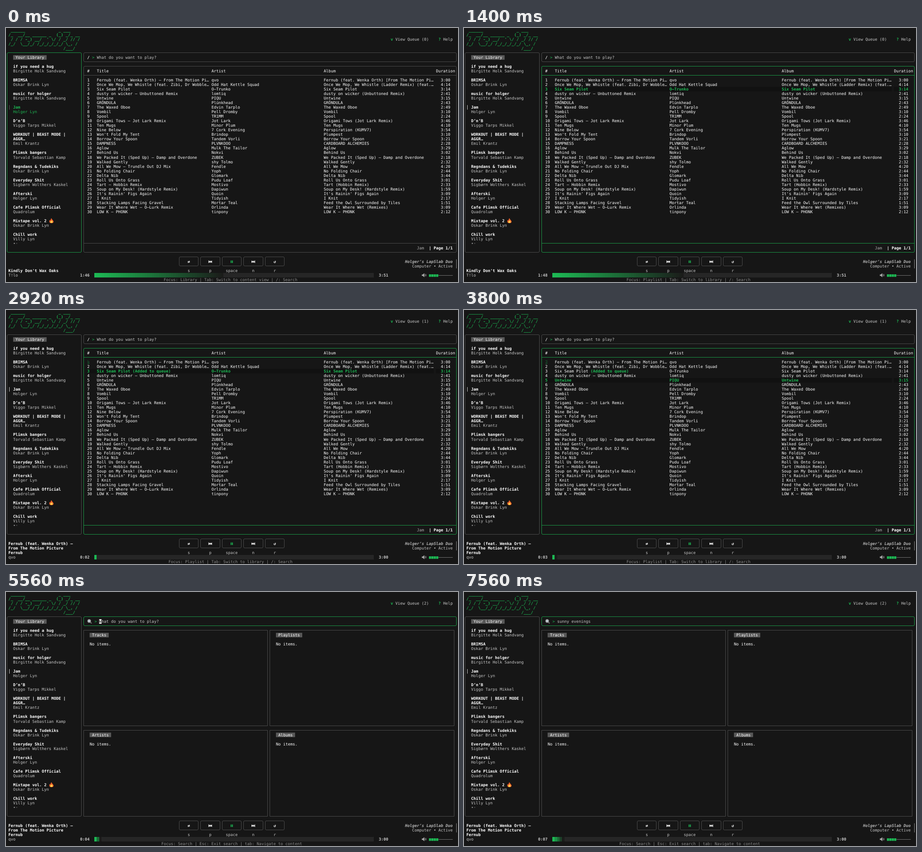
Animation, 998 px wide and 561 px high, one loop 8 s. Source, as an HTML page with a canvas:

```html
<!DOCTYPE html>
<html lang="en">
<head>
<meta charset="utf-8">
<title>Terminal music player</title>
<style>
  html, body { margin: 0; height: 100%; overflow: hidden; background: #161616; }
  canvas { display: block; }
</style>
</head>
<body>
<canvas id="stage" width="998" height="561"></canvas>
<script>
const ctx = document.getElementById('stage').getContext('2d');
const LOOP = 8000, CW = 5.275, RH = 561 / 56, EDGE = .8;
const BG = '#161616', GREEN = '#1db954', WHITE = '#ffffff', LIGHT = '#c8c8c8', GRAY = '#8c8c8c', LINE = '#585858';

const BANNER = [
  ' ______              _ ___',
  '/_  __/__ ______ _  (_) _/_ __',
  " / / / -_) __/  ' \\/ / _/ // /",
  '/_/  \\__/_/ /_/_/_/_/_/ \\_, /',
  '                       /___/'];

const LIBRARY = `if you need a hug|Birgitte Holk Sandvang
BRIMSA|Oskar Brink Lyn
music for holger|Birgitte Holk Sandvang
Jam|Holger Lyn
D’n’B|Viggo Tarps Mikkel
WORKOUT | BEAST MODE |/AGGR…|Emil Krantz
Plimsk bangers|Torvald Sebastian Kamp
Regndans & Tudekiks|Oskar Brink Lyn
Everyday Shit|Sigbørn Wolthers Kaskel
Afterski|Holger Lyn
Cafe Plimsk Official|Quadrolum
Mixtape vol. 2|Oskar Brink Lyn
Chill work|Villy Lyn`.split('\n').map(line => {
  const cut = line.lastIndexOf('|');
  return { title: line.slice(0, cut).split('/'), owner: line.slice(cut + 1) };
});

// title|artist|duration|album (album defaults to the title)
const TRACKS = `Fernub (feat. Wenka Orth) – From The Motion Pi…|qvo|3:00|Fernub (feat. Wenka Orth) [From The Motion Pi…
Once We Mop, We Whistle (feat. Zibi, Dr Wobble…|Odd Hat Kettle Squad|4:14|Once We Mop, We Whistle (Ladder Remix) (feat.…
Six Seam Pilot|O–Trunko|3:14
dusty on wicker – Unbuttoned Remix|lomtiq|2:41|dusty on wicker (Unbuttoned Remix)
Untwine|PIQU|3:15
GRÖNDULA|Plünkhead|2:43
The Waxed Oboe|Edvin Tarplo|2:49
Vombil|Pell Dromby|3:10
Spool|TR1MM|2:24
Origami Tows – Jot Lark Remix|Jot Lark|3:46|Origami Tows (Jot Lark Remix)
Ten Mugs|Minor Plum|4:10
Nine Below|7 Cork Evening|3:54|Perspiration (KUMV7)
Won't Fold My Tent|Brindop|3:10|Plumpest
Borrow Your Spoon|Tandem Vorli|3:21
DAMPNESS|PLVNKOOO|2:28|CARDBOARD ALCHEMIES
Aglow|Mulk The Tailor|3:29
Behind Us|Nokvi|3:02
We Packed It (Sped Up) – Damp and Overdone|ZUBEK|2:18
Walked Gently|shy Tolmo|2:32
All We Mow – Trundle Out DJ Mix|Fendle|4:20|All We Mow
No Folding Chair|Yoph|2:44
Delta Nib|Glomark|3:44
Roll Us Onto Grass|Pudu Loaf|3:01
Tart – Hobbin Remix|Mostivo|2:33|Tart (Hobbin Remix)
Soup on My Desk! (Hardstyle Remix)|Dapiwun|1:59
It's Rainin' Figs Again|Quoin|3:09
I Knit|Tidyish|2:17
Stacking Lamps Facing Gravel|Mortar Teal|1:51|Feed the Owl Surrounded by Tiles
Wear It Where Wet – O–Lurk Remix|Orlinda|3:09|Wear It Where Wet (Remixes)
LOW K – PHONK|tinpony|2:12`.split('\n').map(line => line.split('|'));

const QUERY = 'sunny evenings';
const PROMPT = 'What do you want to play?';
const HELP = {
  library: 'Focus: Library | Tab: Switch to content view | /: Search',
  playlist: 'Focus: Playlist | Tab: Switch to library | /: Search',
  search: 'Focus: Search | Esc: Exit search | tab: Navigate to content'
};

const passed = (times, t) => times.filter(x => x <= t).length;
const clock = s => Math.floor(s / 60) + ':' + String(s % 60).padStart(2, '0');

// Pixel-aligned middle of a cell
const midX = col => Math.floor((col + .5) * CW) + .5;
const midY = row => Math.round((row + .5) * RH) - .5;

function put(col, row, text, color = WHITE, style = '') {
  ctx.font = `${style} 8.762px "DejaVu Sans Mono", "DejaVu Sans", monospace`;
  ctx.fillStyle = color;
  ctx.fillText(text, col * CW, row * RH + 8);
}

function cells(col, row, width, color) {
  ctx.fillStyle = color;
  ctx.fillRect(col * CW, row * RH, width * CW, RH);
}

function box(c0, r0, c1, r1, color, radius = 2.5) {
  const x = midX(c0), y = midY(r0);
  ctx.strokeStyle = color;
  ctx.lineWidth = EDGE;
  ctx.beginPath();
  ctx.roundRect(x, y, midX(c1) - x, midY(r1) - y, radius);
  ctx.stroke();
}

function line(x0, y0, x1, y1, color, width = 1) {
  ctx.strokeStyle = color;
  ctx.lineWidth = width;
  ctx.beginPath();
  ctx.moveTo(x0, y0);
  ctx.lineTo(x1, y1);
  ctx.stroke();
}

function arc(x, y, r, from, to, color) {
  ctx.strokeStyle = color;
  ctx.lineWidth = 1;
  ctx.beginPath();
  ctx.arc(x, y, r, from, to);
  ctx.stroke();
}

function shape(path, x, y, color, flip = 1) {
  ctx.save();
  ctx.translate(x, y);
  ctx.scale(flip, 1);
  ctx.fillStyle = color;
  ctx.fill(new Path2D(path));
  ctx.restore();
}

function tag(col, row, text) {
  cells(col, row, text.length + 2, LINE);
  put(col + 1, row, text);
}

function drawHeader(queued) {
  BANNER.forEach((text, i) => put(1, i, text, GREEN, 'bold'));
  put(161, 2, 'v', GREEN, 'bold');
  put(163, 2, `View Queue (${queued})`, LIGHT);
  put(181, 2, '?', GREEN, 'bold');
  put(183, 2, 'Help', LIGHT);
}

function drawLibrary(focused) {
  box(0, 5, 31, 49, focused ? GREEN : LINE);
  tag(3, 6, 'Your Library');
  let row = 8;
  for (const { title, owner } of LIBRARY) {
    const current = title[0] === 'Jam', lit = current && focused;
    if (current) line(midX(1), row * RH, midX(1), (row + 1) * RH, focused ? LINE : LIGHT);
    for (const part of title) put(3, row++, part, lit ? GREEN : WHITE, 'bold');
    put(3, row, owner, lit ? GREEN : LIGHT);
    row += 2;
  }
  shape('M0-5.5C.5-3 4-1 4.6 1.5C5.2 4 3 5.5 0 5.5S-5 4-4.6 1C-4.4-.5-3.6-1.2-3.2-2C-2.7-1-2-.6-1.6-.6C-2-2.5-1.2-4.4 0-5.5Z', 100.3, 425.6, '#f4622a');
  shape('M.3-1.5C1 0 3 1 2.8 3C2.6 5-2.4 5.2-2.7 3C-2.8 1.5-1.6 1.6-1.3.6C0 .8 .4-.4 .3-1.5Z', 100.3, 425.8, '#ffd34d');
  put(3, 47, '•', '#a0a0a0');
  put(4, 47, '•', '#454545');
}

// Braille cell with one dot missing, running counter-clockwise
function drawSpinner(step) {
  const hole = [0, 2, 4, 6, 7, 5, 3, 1][step % 8];
  ctx.fillStyle = GREEN;
  for (let i = 0; i < 8; i++)
    if (i !== hole) ctx.fillRect(180.4 + (i % 2) * 2.2, 111.6 + (i >> 1) * 2.2, 1, 1);
}

function drawPlaylist(t, focused) {
  const border = focused ? GREEN : LINE;
  const selected = passed([200, 1320, 1400, 3400, 3520], t);
  const added = t >= 4520 ? 5 : t >= 2400 && t < 4240 ? 3 : 0;
  box(32, 5, 188, 7, LINE);
  put(34, 6, '/', WHITE, 'bold');
  put(36, 6, '>', GREEN);
  put(38, 6, PROMPT, LIGHT);
  box(32, 8, 188, 49, border);
  for (const row of [10, 47]) line(midX(32), midY(row), midX(188), midY(row), border, EDGE);
  [[34, '#'], [38, 'Title'], [86, 'Artist'], [133, 'Album'], [180, 'Duration']]
    .forEach(([col, text]) => put(col, 9, text));
  TRACKS.forEach(([title, artist, duration, album = title], i) => {
    const n = i + 1, row = n + 10, on = n === selected;
    const style = on ? [GREEN, 'bold'] : [WHITE];
    if (on) {
      cells(34, row, 145, '#111111');
      cells(180, row, 6, '#111111');
    }
    if (n === 1 && t >= 2000) drawSpinner(5 + Math.floor((t - 2000) / 450));
    else put(34, row, n, ...style);
    put(38, row, title, ...style);
    if (n === added) put(39 + title.length, row, '(Added to queue)', GREEN, 'bold');
    put(86, row, artist, ...style);
    put(133, row, album, ...style);
    put(182, row, duration, ...style);
  });
  put(172, 48, 'Jam', '#b0b0b0');
  put(177, 48, '| Page 1/1', WHITE, 'bold');
}

function drawSearch(t) {
  box(32, 5, 188, 7, GREEN);
  line(186, 66.5, 189, 69.3, '#777777', 2);
  shape('M-3.6 0a3.6 3.6 0 1 0 7.2 0a3.6 3.6 0 1 0-7.2 0Z', 183.6, 64, '#b9c4c9');
  arc(183.6, 64, 3.6, 0, 7, '#858585');
  put(37, 6, '>', GREEN);
  const typed = Math.max(0, Math.min(QUERY.length, 1 + Math.floor((t - 5740) / 93.5)));
  put(39, 6, typed ? QUERY.slice(0, typed) : PROMPT, LIGHT);
  if (t < 7490) {
    cells(39 + typed, 6, 1, WHITE);
    if (!typed) put(39, 6, PROMPT[0], BG);
  }
  [['Tracks', 32, 8, 29], ['Playlists', 110, 8, 29], ['Artists', 32, 30, 49], ['Albums', 110, 30, 49]]
    .forEach(([name, col, top, bottom]) => {
      box(col, top, col + 77, bottom, LINE, 0);
      tag(col + 3, top + 1, name);
      put(col + 3, top + 3, 'No items.');
    });
}

function drawButtons() {
  const skip = 'M-4-2.7h1.2v2.5L.4-2.7V-.2L3.8-2.7V2.7L.4.2V2.7L-2.8.2V2.7H-4Z';
  ['s', 'p', 'space', 'n', 'r'].forEach((key, i) => {
    const left = 72 + 9 * i, x = (left + 4.5) * CW, y = 51.5 * RH + .3;
    box(left, 50, left + 8, 52, LINE);
    put(left + 4.5 - key.length / 2, 53, key, LIGHT);
    if (i === 0) put(left + 4, 51, '⇄', WHITE, 'bold');
    if (i === 1) shape(skip, x, y, WHITE);
    if (i === 2) shape('M-2.4-2.7h1.8v5.4h-1.8ZM.6-2.7h1.8v5.4h-1.8Z', x, y, GREEN);
    if (i === 3) shape(skip, x, y, WHITE, -1);
    if (i === 4) put(left + 4, 51, '↺', WHITE, 'bold');
  });
}

function drawProgress(elapsed, total) {
  const start = 37, width = 117, filled = Math.round(width * elapsed / total);
  const edge = col => Math.round((start + col) * CW);
  ctx.setLineDash([1, 1]);
  for (let y = 0; y < 10; y++)
    line(edge(filled) + y % 2, 541.5 + y, edge(width), 541.5 + y, '#363636');
  ctx.setLineDash([]);
  const from = [29, 185, 84], to = [27, 28, 26];
  for (let i = 0; i < filled; i++) {
    const p = filled > 1 ? i / (filled - 1) : 0;
    ctx.fillStyle = `rgb(${from.map((v, k) => Math.round(v + (to[k] - v) * p))})`;
    ctx.fillRect(edge(i), 541, edge(i + 1) - edge(i), 10);
  }
  put(31, 54, clock(elapsed), LIGHT, 'bold');
  put(156, 54, clock(total), LIGHT, 'bold');
}

function drawPlayer(t, focus) {
  const second = t >= 1800;
  const name = second
    ? ['Fernub (feat. Wenka Orth) –', 'From The Motion Picture', 'Fernub']
    : ["Kindly Don't Wax Oaks"];
  name.forEach((text, i) => put(1, 54 - name.length + i, text, WHITE, 'bold'));
  put(1, 54, second ? 'qvo' : 'T!lo', LIGHT);
  drawButtons();
  if (second) drawProgress(passed([2000, 2880, 3800, 4700, 5640, 6540, 7480], t), 180);
  else drawProgress(106 + passed([200, 1080], t), 231);
  const help = HELP[focus];
  put(Math.floor((189 - help.length) / 2), 55, help, GRAY);

  put(167, 51, 'Holger’s LapSlab Duo', '#b4b4b4', 'italic bold');
  put(170, 52, 'Computer • Active', LIGHT);
  line(midX(188), 51 * RH, midX(188), 53 * RH, GRAY);
  shape('M-4.5-1.5h2L1.2-4.5v9L-2.5 1.5h-2Z', 922.6, 546, '#a8a8a8');
  for (const r of [2, 4]) arc(923.6, 546, r, -.8, .8, '#a8a8a8');
  ctx.fillStyle = GREEN;
  for (let i = 0; i < 4; i++) ctx.fillRect((177 + i) * CW + .2, 544, CW - .5, 5.6);
  line(181 * CW, 546.5, 187 * CW, 546.5, GRAY, EDGE);
}

function draw(now) {
  const t = now % LOOP;
  const focus = t < 200 ? 'library' : t < 5560 ? 'playlist' : 'search';
  ctx.textRendering = 'geometricPrecision';
  ctx.fillStyle = BG;
  ctx.fillRect(0, 0, 998, 561);
  drawHeader(passed([2400, 4520], t));
  drawLibrary(focus === 'library');
  if (focus === 'search') drawSearch(t);
  else drawPlaylist(t, focus === 'playlist');
  drawPlayer(t, focus);
}

const begin = performance.now();
function tick() {
  draw(performance.now() - begin);
  requestAnimationFrame(tick);
}
tick();
</script>
</body>
</html>
```
